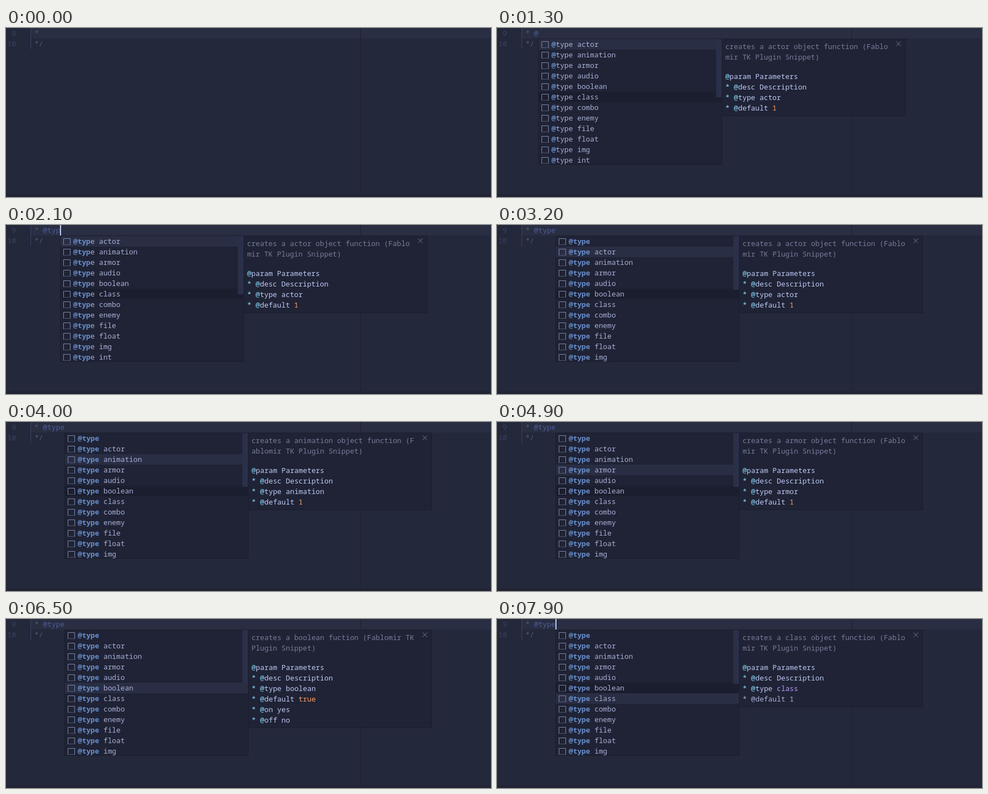
These frames come from a looping animation (872 px wide and 305 px high, 8 s). An HTML page:

```html
<!DOCTYPE html>
<html lang="en">
<head>
<meta charset="utf-8">
<title>Snippet completion</title>
<style>
  html, body { margin: 0; width: 100%; height: 100%; overflow: hidden; background: #24283b; }
  svg { display: block; }
  text { font: 12.83px "Noto Sans Mono", "DejaVu Sans Mono", monospace; white-space: pre; }
</style>
</head>
<body>
<svg id="stage" width="872" height="305" viewBox="0 0 872 305"></svg>
<script>
const LOOP = 8000, CH = 7.698, ROW = 19, COL0 = 43.5;
const C = {
  bg: '#24283b', line: '#2a2e42', strip: '#202434', ruler: '#1c2030', guide: '#3b4261',
  num: '#3b4261', comment: '#555a72', tag: '#4c5f9c', cursor: '#c0caf5',
  panel: '#1f2335', border: '#1a1d2c', hover: '#1b1e2e', pick: '#292e44', thumb: '#2a3049',
  text: '#a9b1d6', match: '#6a8fcc', icon: '#8088a8', desc: '#787d9b',
  code: '#c0caf5', punct: '#89ddff', value: '#ff9e64', keyword: '#bb9af7'
};
const TYPES = ['actor', 'animation', 'armor', 'audio', 'boolean', 'class',
  'combo', 'enemy', 'file', 'float', 'img', 'int'];

// [time, value] pairs
const typed = [[0, 0], [900, 1], [1700, 2], [1900, 3], [2100, 4], [2400, 5]];
const picked = [[0, 0], [3200, 1], [4000, 2], [4900, 3], [5800, 4], [6500, 5], [7300, 6]];
const blink = [[0, 0], [600, 1], [1300, 0], [1700, 1], [2900, 0], [3300, 1], [3800, 0], [4200, 1],
  [4700, 0], [5100, 1], [5600, 0], [6100, 1], [6500, 0], [7000, 1], [7400, 0], [7900, 1]];
const POPUP_AT = 1000;

const at = (track, t) => track.filter(k => k[0] <= t).pop()[1];
const rect = (x, y, w, h, fill) => `<rect x="${x}" y="${y}" width="${w}" height="${h}" fill="${fill}"/>`;
const span = (s, fill, bold) => `<tspan fill="${fill}"${bold ? ' font-weight="600"' : ''}>${s}</tspan>`;
const text = (x, y, body, fill = C.text, extra = '') => `<text x="${x}" y="${y}" fill="${fill}" ${extra}>${body}</text>`;
const path = (d, stroke, extra = '') => `<path d="${d}" fill="none" stroke="${stroke}" ${extra}/>`;

function docFor(type) {
  const kind = type === 'boolean' ? 'boolean fuction' : type ? type + ' object function' : 'type function';
  const head = `creates a ${kind} (Fablomir TK Plugin Snippet)`;
  const rest = {
    '': ['type', 'default'],
    audio: ['type file', 'dir audio/', 'require 1'],
    boolean: ['type boolean', 'default true', 'on yes', 'off no']
  }[type] || ['type ' + type, 'default 1'];
  return { head: [head.slice(0, 38), head.slice(38).trim()],
    code: ['@param Parameters', '* @desc Description', ...rest.map(s => '* @' + s)] };
}

// A bare "class" is read as a keyword and the line after it loses its colours.
function paint(line, plain) {
  if (plain) return span(line, C.text);
  return line.split(/([*@]|\b1$|\btrue$|\bclass$)/).map(s =>
    span(s, /^[*@]$/.test(s) ? C.punct : /^(1|true)$/.test(s) ? C.value : s === 'class' ? C.keyword : C.code)).join('');
}

function editor(n, on) {
  const x = COL0 + 3 * CH, it = 'font-style="italic"';
  return rect(0, 0, 872, 305, C.bg) + rect(44, 0, 828, 19, C.line) + rect(0, 300, 872, 5, C.strip) +
    rect(637, 0, 1, 300, C.ruler) + rect(44, 0, 1, 38, C.guide) +
    text(18, 14, '9', C.num, 'text-anchor="end"') + text(18, 33, '10', C.num, 'text-anchor="end"') +
    text(COL0 + CH, 14, '*', C.comment, it) + text(COL0 + CH, 33, '*/', C.comment, it) +
    text(x, 14, '@type'.slice(0, n), C.tag, it) +
    (on ? rect(Math.floor(x + n * CH), 0, 2, 19, C.cursor) : '');
}

function list(L, n, sel) {
  const full = n === 5;
  const items = (full ? [''] : []).concat(TYPES).slice(0, 12);
  let s = rect(L - 1, 19, 331, 228, C.border) + rect(L, 20, 329, 226, C.panel) +
    rect(L, 20 + 5 * ROW, 329, ROW, C.hover) + rect(L, 20 + sel * ROW, 329, ROW, C.pick) +
    rect(L + 319, 20, 10, full ? 97 : 105, C.thumb);
  items.forEach((type, i) => {
    const y = 20 + i * ROW, x = L + 5.5;
    s += path(`M${x} ${y + 15}V${y + 4.5}h12V${y + 15}`, C.icon) +
      path(`M${x - .5} ${y + 15.5}h13`, C.icon, 'stroke-dasharray="1 1"') +
      text(L + 23, y + 14, span('@type'.slice(0, n), C.match, true) + span('@type'.slice(n) + ' ' + type, C.text));
  });
  return `<g clip-path="url(#fold)">${s}</g>` + rect(L - 1, 246, 331, 1, C.border);
}

function docs(L, type) {
  const { head, code } = docFor(type), x = L + 335.4;
  const h = 63 + code.length * ROW, cx = L + 647, cy = 28.5;
  return rect(L + 329, 19, 331, h + 1, C.border) + rect(L + 330, 20, 329, h - 1, C.panel) +
    path(`M${cx - 4} ${cy - 4}l8 8m0 -8l-8 8`, C.desc) +
    head.map((s, i) => text(x, 38 + i * ROW, s, C.desc)).join('') +
    code.map((s, i) => text(x, 92 + i * ROW, paint(s, i && /class$/.test(code[i - 1])))).join('');
}

const stage = document.getElementById('stage');
let last = '';

function render(t) {
  const n = at(typed, t), sel = at(picked, t), on = at(blink, t), open = t >= POPUP_AT;
  const key = [n, sel, on, open].join();
  if (key === last) return;
  last = key;
  let s = '<clipPath id="fold"><rect width="872" height="247"/></clipPath>' + editor(n, on);
  if (open) {
    const L = Math.round(75 + (n - 1) * CH);
    const type = n < 5 ? TYPES[0] : sel ? TYPES[sel - 1] : '';
    s += list(L, n, sel) + docs(L, type);
  }
  stage.innerHTML = s;
}

const start = performance.now();
function tick() {
  render((performance.now() - start) % LOOP);
  requestAnimationFrame(tick);
}
tick();
</script>
</body>
</html>
```
